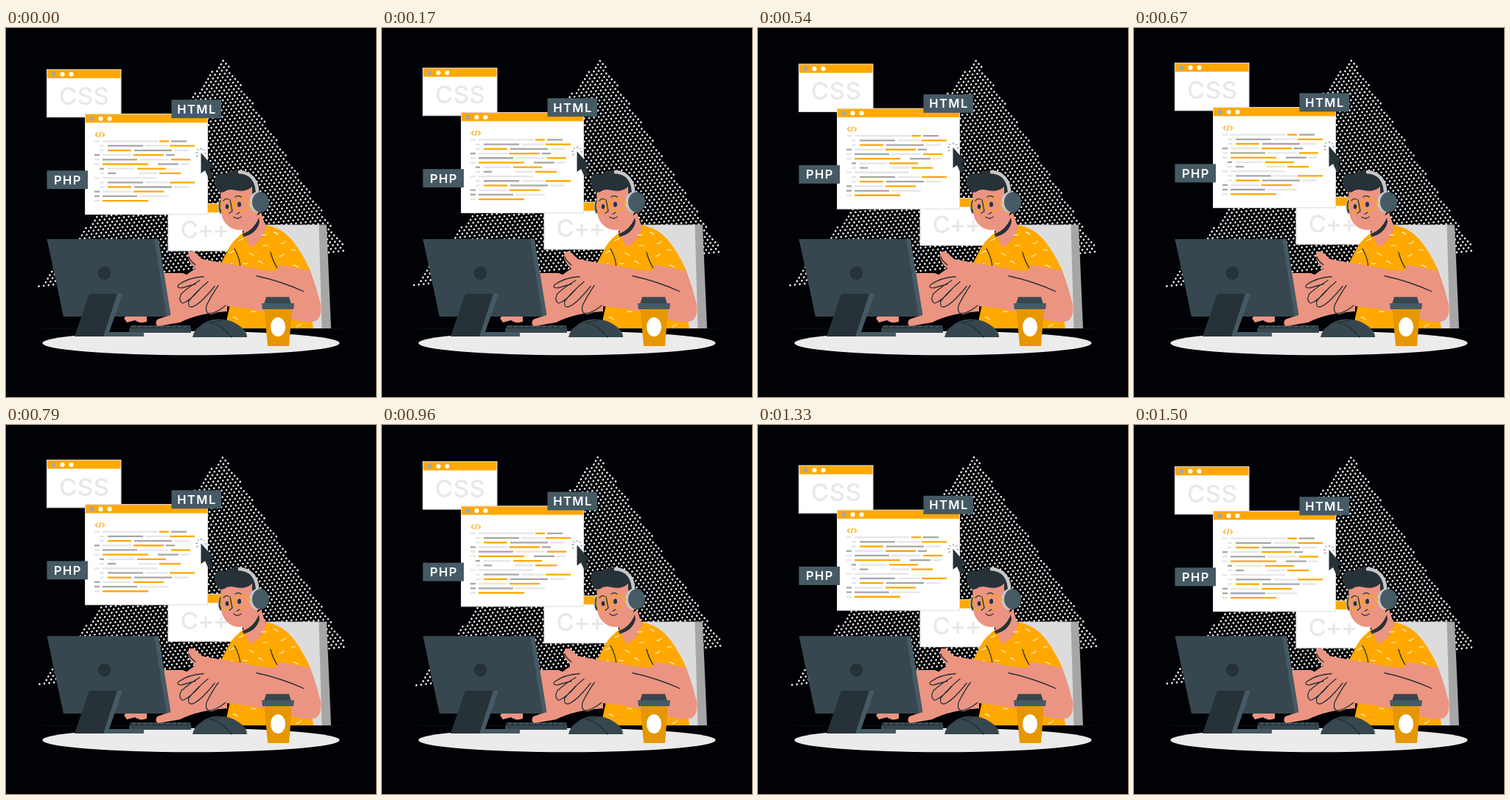
These frames come from a looping animation (502x500 px, 1540 ms). An HTML page:

```html
<!DOCTYPE html>
<html lang="en">
<head>
<meta charset="utf-8">
<title>Programmer at a desk</title>
<style>
html, body { margin: 0; width: 100%; height: 100%; overflow: hidden; background: #000206; }
svg { display: block; width: 100%; height: 100%; }
text { font-family: Inter, Lato, sans-serif; text-anchor: middle; }
.skin { fill: #eb9481; }
.dark { fill: #263238; }
.steel { fill: #37474f; }
.slate { fill: #455a64; }
.orange { fill: #ffa800; }
.ink { fill: none; stroke: #263238; stroke-width: 1.3; stroke-linecap: round; stroke-linejoin: round; }
</style>
</head>
<body>
<svg viewBox="0 0 502 500">
  <g id="halftone">
    <path id="dots" transform="translate(45 350.5) rotate(-6.8)" fill="none" stroke="#f5f5f5" stroke-width="2.7" stroke-linecap="round"/>
  </g>
  <g id="floating"></g>

  <g id="chair">
    <path d="M345 266.500H426L430 407H345Z" fill="#dcdcdc"/>
    <path d="M424.500 266.500H435L441 407H428.500Z" fill="#a6a6a6"/>
  </g>
  <path d="M50 407.5H455" stroke="#0c1114"/>

  <g id="body">
    <path class="orange" d="M322 277Q308 288 303 297L292 318L305 370L297 407H417L414 390L366 330L413 329Q403 307 391 291Q376 271 352 267Z"/>
    <path class="skin" d="M320 270L323 278L331 297Q345 292 353 271L346 250Z"/>
    <path class="dark" d="M321 279Q336 274 343 257L344 263Q340 279 322 283Z"/>
    <path class="ink" d="M359 304Q362 316 368 325M310 299Q317 311 318 325"/>
    <path id="flecks" fill="none" stroke="#fff3d6" stroke-width="1.2" stroke-linecap="round"/>
  </g>

  <g id="head">
    <ellipse cx="292" cy="242" rx="4" ry="10" fill="#37474f" stroke="#c7c7c7"/>
    <path class="skin" d="M291 217L292 249Q293 263 304 270Q317 278 331 269Q342 259 344 240L338 207L312 205Z"/>
    <path class="dark" d="M287 220Q280 208 285 200Q290 196 298 198Q306 192 318 193Q333 195 339 207Q344 220 339 230L334 227L334 215Q325 223 312 220Q302 217 296 222Q290 224 287 220Z"/>
    <path d="M315 195C333 195 342 208 341 226" fill="none" stroke="#c7c7c7" stroke-width="4.6"/>
    <ellipse cx="341.5" cy="236" rx="11.5" ry="14" fill="#c7c7c7"/>
    <ellipse cx="345.5" cy="236" rx="11.5" ry="13.8" class="slate"/>
    <g fill="none" stroke="#ffa800" stroke-width="1.3">
      <ellipse cx="298" cy="241" rx="7" ry="9"/>
      <circle cx="319" cy="239" r="9.5"/>
      <path d="M305 239Q308 236 310 238M328 237L332 236"/>
    </g>
    <ellipse cx="300" cy="242" rx="2.3" ry="3.2" class="dark"/>
    <ellipse cx="316.5" cy="239" rx="2.5" ry="3.6" class="dark"/>
    <path class="ink" d="M295 234Q298 230 302 232M311 229Q315 226 319 229M304 233L307 248L303 251M309 256Q314 260 319 256M313 252L317 250"/>
  </g>

  <g id="table">
    <ellipse cx="251" cy="427" rx="201.5" ry="16.2" fill="#ebebeb"/>
    <path class="dark" d="M169 403H250L252 409H167Z"/>
    <path d="M170 404.5H250" stroke="#455a64" stroke-width="2" stroke-dasharray="6 1.8"/>
    <path class="steel" d="M167 407H251V413H167Z"/>
  </g>

  <g id="arms">
    <path class="skin" d="M205 332H240L300 360V384Q262 386 236 399L207 404Q201 402 205 395L222 389Z"/>
    <path class="skin" d="M160 393Q166 386 178 387L191 391V398Q181 401 175 396L164 399Z"/>
    <path class="skin" d="M247 307Q248 302 255 303L266 313Q290 318 318 322Q345 329 366 329L371 321L413 329Q421 351 427 374Q429 392 420 397Q407 401 381 393Q343 380 300 377Q289 385 279 388Q271 388 272 382Q258 386 249 378Q246 373 249 367Q239 375 234 368L238 352Q232 351 234 346Q242 335 257 326Q246 317 247 307Z"/>
    <path class="ink" d="M340 336Q373 343 404 357M268 337Q248 338 234 348Q231 353 239 352L257 347M263 342Q249 350 238 360Q233 370 240 373Q249 370 263 354M274 344Q258 357 248 370Q246 378 252 378Q262 376 283 350M288 349Q280 360 272 376Q270 387 277 387Q287 385 298 376M248 310Q249 315 257 321"/>
  </g>

  <g id="monitor">
    <path class="slate" d="M196 286H207L223.500 389L217 391Z"/>
    <path class="steel" d="M55.5 286H201L218 391H78Z"/>
    <circle cx="133.5" cy="332" r="9" class="dark"/>
    <path class="slate" d="M148 360H158L140 412H187V418H125Z"/>
    <path class="dark" d="M113 360H151L132 418H93Z"/>
  </g>

  <g id="mouse">
    <path class="steel" d="M253 419Q255 409 263 404Q273 395 286 394.5Q305 394 316 403Q327 410 327 419Z"/>
    <path class="ink" d="M276 399Q292 401 306 419M276 399Q286 398 293 395"/>
  </g>

  <g id="cup">
    <path d="M350.5 380H388L384 431H355Z" fill="#e69700"/>
    <path class="steel" d="M353 364.500H384L387 374H350Z"/>
    <path class="slate" d="M347 373H391L390 381H348Z"/>
    <ellipse cx="369" cy="405" rx="10" ry="13" fill="#fff"/>
  </g>
</svg>
<script>
const $ = id => document.getElementById(id);
const LOOP = 1540;
const INK = { L: '#e6e6e6', G: '#a6a6a6', O: '#ffa800' };

// Staggered rows narrowing to the apex
const STEP = 6.6, ROWS = 63;
let dots = '';
for (let row = 0; row <= ROWS; row++) {
  const shift = row % 2 * STEP / 2;
  const left = 285 * row / ROWS, right = 421 - 136 * row / ROWS;
  for (let x = Math.ceil((left - shift) / STEP) * STEP + shift; x <= right; x += STEP)
    dots += `M${x.toFixed(1)} ${(-279 * row / ROWS).toFixed(1)}h0`;
}
$('dots').setAttribute('d', dots);

const flecks = [[319, 288], [350, 280], [366, 277], [376, 292], [352, 295], [333, 305], [306, 305],
  [325, 319], [345, 316], [374, 309], [390, 301], [393, 321], [304, 322], [336, 384], [311, 392], [397, 404]];
$('flecks').setAttribute('d', flecks.map(([x, y], i) =>
  `M${x - 3} ${y}q3 ${i % 2 ? 1 : -1} 6 ${i % 3 * 3 - 3}`).join(''));

const panel = (x, y, w, h) => `
  <rect x="${x}" y="${y}" width="${w}" height="${h}" fill="#fff" stroke="#dedede"/>
  <rect x="${x + .5}" y="${y + .5}" width="${w - 1}" height="11.3" class="orange"/>
  ${[9, 21, 33].map((dx, i) => `<circle cx="${x + dx}" cy="${y + 6.3}" r="3.1" fill="${i ? '#fff' : INK.G}"/>`).join('')}`;

const label = (x, y, size, weight, fill, spacing, str) =>
  `<text x="${x + spacing / 2}" y="${y}" font-size="${size}" font-weight="${weight}" fill="${fill}" letter-spacing="${spacing}">${str}</text>`;

const tag = (x, y, w, str) =>
  `<rect x="${x}" y="${y}" width="${w}" height="25" class="slate"/>` + label(x + w / 2, y + 18.4, 16.5, 600, '#fff', 1.4, str);

// Each dash: colour, start, end
const code = `L120-127 L131-206 O208-221 G224-245
L127-133 G138-186 L189-219 O222-256
L127-133 O138-170 G174-225 L228-248
G120-127 L131-170 O173-214 G217-229
L120-127 G131-178 L181-220 O224-250
L120-127 O131-193 G206-234 L237-249
G127-133 L138-175 O178-217
L127-133 G138-149 L180-205 O208-237
L120-127 L131-205
L127-133 G138-186 L189-219 O222-256
L127-133 O138-170 G174-225 L228-248
G120-127 L131-170 O173-214
G120-127 G131-178 L181-221
L120-127 O131-193`;
const codeLines = code.split('\n').map((line, i) => line.split(' ').map(dash => {
  const [from, to] = dash.slice(1).split('-');
  return `<path d="M${from} ${153.5 + i * 6.2}H${to}" stroke="${INK[dash[0]]}" stroke-width="2.3"/>`;
}).join('')).join('');

$('floating').innerHTML =
  panel(220, 238, 100.5, 64) + label(270, 285.5, 33, 500, '#e8e8e8', -1, 'C++') +
  panel(55.5, 56.3, 100.5, 64.5) + label(106, 104.5, 33, 500, '#e8e8e8', .5, 'CSS') +
  panel(107.5, 116.5, 166, 136) + codeLines +
  `<path d="M124.5 141.500l-3 3 3 3M130.5 141.500l3 3-3 3M128.5 140.500l-2 8" fill="none" stroke="#ffa800" stroke-width="1.3"/>
   <path d="M264.5 169V197L270 193L275 204L281 201L276.500 190.500L283 190Z" class="dark"/>
   <path d="M260 173l-1.5 1M259.5 169h-1.5M261 165.5l-1-1M265 164.5v-1.5M268.5 166l1-1M270 170h1.500" class="ink" style="stroke-width:.8"/>` +
  tag(224.5, 97.2, 67.5, 'HTML') + tag(55.5, 193.2, 55.5, 'PHP');

function draw(now) {
  const phase = now % LOOP / LOOP * 2 * Math.PI + .175;
  const lift = 4.25 * Math.cos(phase) + .35 * Math.cos(3 * phase) - 4.5;
  $('floating').setAttribute('transform', `translate(0 ${lift.toFixed(2)})`);
  $('halftone').setAttribute('transform', `rotate(${(.75 * Math.sin(phase)).toFixed(3)} 253 195)`);
  requestAnimationFrame(draw);
}
draw(performance.now());
</script>
</body>
</html>
```
